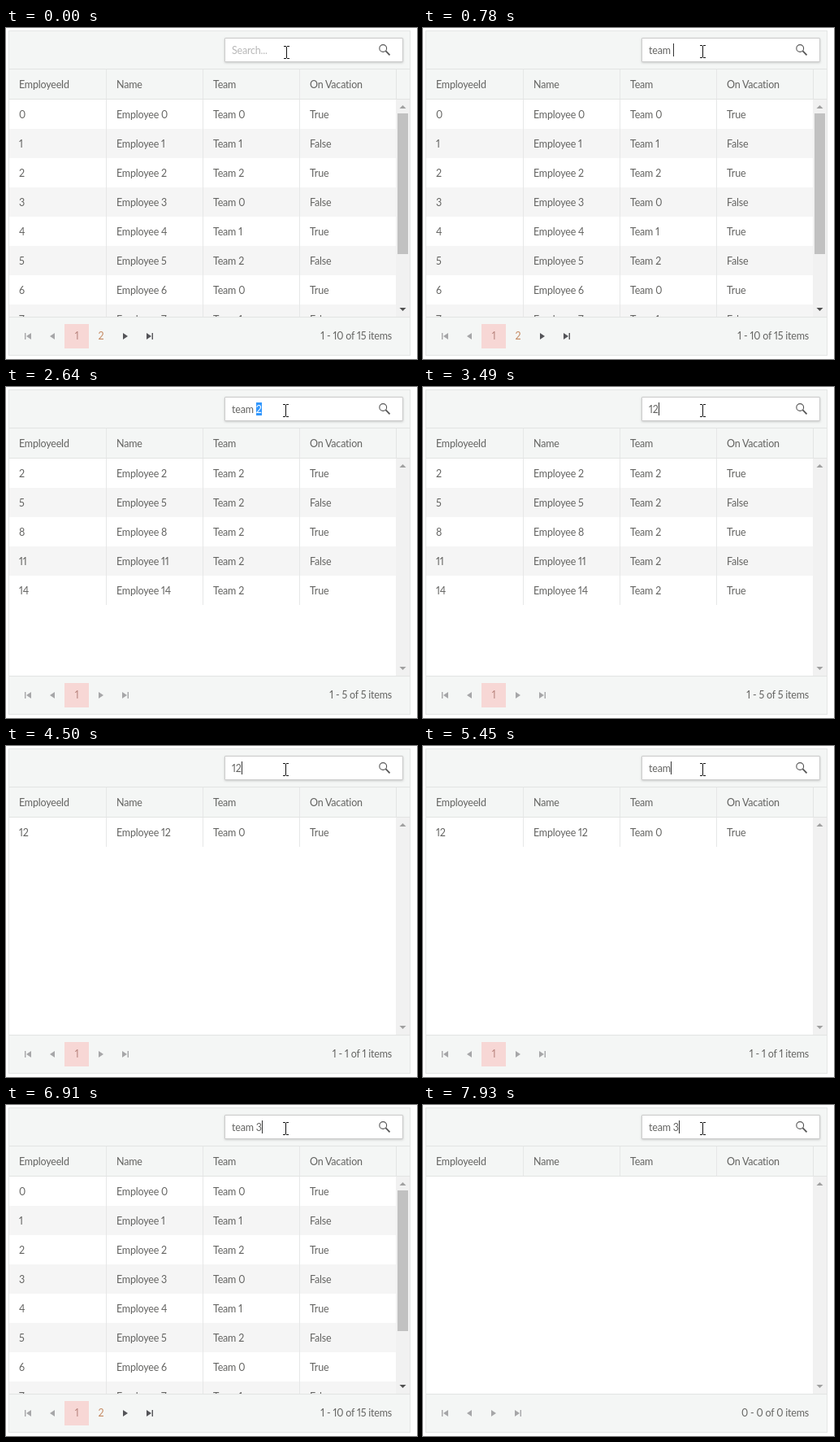
These frames come from a looping animation (506x407 px, 8000 ms). An HTML page:

```html
<!DOCTYPE html>
<html lang="en">
<head>
<meta charset="utf-8">
<title>Grid search</title>
<style>
  html, body { margin: 0; width: 100%; height: 100%; overflow: hidden; background: #fff; }
  body {
    position: relative;
    font: 12.5px/38px Lato, "Open Sans", sans-serif;
    font-variant-numeric: proportional-nums;
    letter-spacing: -.2px;
    color: #646462;
    white-space: pre;
  }
  .grid, .grid > *, .search, .thumb, .caret, svg { position: absolute; box-sizing: border-box; }
  svg { left: 0; top: 0; }
  .grid { left: 3px; top: 3px; width: 495px; height: 400px; border: 1px solid #e4e6e5; background: #f4f6f5; overflow: hidden; }
  .head { left: 0; top: 46px; width: 493px; height: 38px; border: solid #e2e4e3; border-width: 1px 0; }
  .row { display: flex; width: 477px; height: 36px; background: #fff; }
  .row:nth-child(even) { background: #f5f5f5; }
  .head .row { background: none; }
  .cell { box-sizing: border-box; width: 119px; padding-left: 12px; border-left: 1px solid #e6e7e7; }
  .cell:first-child { border-left-color: transparent; margin-left: -1px; width: 120px; }
  .cell:last-child { width: 120px; }
  .head .cell:last-child { border-right: 1px solid #e2e4e3; }
  .body { left: 0; top: 84px; width: 476px; height: 267px; background: #fff; overflow: hidden; }
  .track { left: 476px; top: 84px; width: 17px; height: 267px; background: #f1f1f1; }
  .thumb { left: 2px; top: 17px; width: 13px; height: 173px; background: #c1c1c1; }
  .pager { left: 0; top: 351px; width: 493px; height: 47px; border-top: 1px solid #e2e4e3; line-height: 30px; }
  .pages { position: absolute; left: 8px; top: 8px; display: flex; }
  .pages > * { position: static; width: 30px; height: 30px; text-align: center; }
  .num { color: #c58a62; }
  .num.on { color: #b9857f; background: #f7d7d5; }
  .info { position: absolute; right: 22px; top: 8px; }
  .search {
    left: 269px; top: 12px; width: 220px; height: 30px; padding-left: 8px;
    border: 1px solid #cbcbcb; border-radius: 1px; background: #fff;
    box-shadow: 0 1px 3px rgba(0, 0, 0, .18); line-height: 30px;
  }
  .hint { color: #b8b8b8; }
  .sel { display: inline-block; padding-top: 2px; line-height: 14px; background: #3297fd; color: #fff; }
  .caret { top: 6px; width: 1px; height: 16px; background: #333; }
</style>
</head>
<body>
<div class="grid">
  <div class="head" id="head"></div>
  <div class="body" id="body"></div>
  <div class="track">
    <div class="thumb" id="thumb"></div>
    <svg width="17" height="267">
      <path d="M4.5 11h8l-4-4z" fill="#a0a0a0"/>
      <path id="down" d="M4.5 256h8l-4 4z"/>
    </svg>
  </div>
  <div class="pager">
    <div class="pages" id="pages"></div>
    <div class="info" id="info"></div>
  </div>
</div>
<div class="search" id="search"></div>
<svg style="left:458px;top:19px" width="16" height="16" fill="none" stroke="#555">
  <circle cx="6.2" cy="6" r="4.4" stroke-width="1.1"/>
  <path d="M9.4 9.2L14.5 14.3" stroke-width="1.8"/>
</svg>
<svg id="beam" width="7" height="16" fill="none" stroke="#111">
  <path d="M0 .5h3M4 .5h3M3.5 1v14M0 15.5h3M4 15.5h3"/>
</svg>
<script>
const LOOP = 8000;
const $ = id => document.getElementById(id);

// time, typed text, caret shown, start of selection
const TYPING = [
  [0, "", 0],
  [230, "t", 1], [300, "te", 1], [380, "tea", 1], [530, "team", 1],
  [780, "team ", 1], [1080, "team 2", 1], [1630, "team 2", 0], [2180, "team 2", 1],
  [2640, "team 2", 0, 5], [2790, "team 2", 0, 0],
  [3420, "1", 1], [3490, "12", 1], [4040, "12", 0], [4500, "12", 1], [4670, "12", 0, 0],
  [5200, "te", 1], [5280, "tea", 1], [5450, "team", 1], [5980, "team", 0], [6440, "team", 1],
  [6610, "team ", 1], [6910, "team 3", 1], [7400, "team 3", 0], [7930, "team 3", 1]
];
const QUERIES = [[0, ""], [1480, "team 2"], [3810, "12"], [5750, "team"], [7230, "team 3"]];
const POINTER = [[0, 342, 22], [610, 341, 21]];

const PAGE_SIZE = 10;
const people = Array.from({ length: 15 }, (_, i) =>
  [String(i), "Employee " + i, "Team " + i % 3, i % 2 ? "False" : "True"]);

const ICONS = {
  first: "M11 11h1.4v8h-1.4zM19 11v8l-6-4z",
  prev: "M18 11v8l-6-4z",
  next: "M12 11v8l6-4z",
  last: "M11 11v8l6-4zM17.6 11h1.4v8h-1.4z"
};

const tag = (name, text) => `<span class="${name}">${text}</span>`;
const rowHtml = cells =>
  `<div class="row">${cells.map(c => `<div class="cell">${c}</div>`).join("")}</div>`;
const icon = (name, active) =>
  `<svg><path d="${ICONS[name]}" fill="${active ? "#545458" : "#a6a6a8"}"/></svg>`;

function stepAt(table, t) {
  let step = table[0];
  for (const s of table) if (s[0] <= t) step = s;
  return step;
}

function drawInput([, text, caret, from]) {
  let html = text || tag("hint", "Search...");
  if (from !== undefined) html = text.slice(0, from) + tag("sel", text.slice(from));
  $("search").innerHTML = html + (caret ? tag("caret", "") : "");
}

function drawTable([, query]) {
  const found = people.filter(p => p.some(c => c.toLowerCase().includes(query)));
  const total = found.length;
  const shown = found.slice(0, PAGE_SIZE);
  const count = Math.ceil(total / PAGE_SIZE);
  const more = count > 1;
  let numbers = "";
  for (let i = 1; i <= count; i++) numbers += tag(i === 1 ? "num on" : "num", i);

  $("body").innerHTML = shown.map(rowHtml).join("");
  $("pages").innerHTML = icon("first") + icon("prev") + numbers + icon("next", more) + icon("last", more);
  $("info").textContent = `${total ? 1 : 0} - ${shown.length} of ${total} items`;
  $("thumb").style.display = more ? "" : "none";
  $("down").setAttribute("fill", more ? "#505050" : "#a0a0a0");
}

function drawPointer([, x, y]) {
  $("beam").style.transform = `translate(${x}px, ${y}px)`;
}

const layers = [[TYPING, drawInput], [QUERIES, drawTable], [POINTER, drawPointer]]
  .map(([table, draw]) => ({ table, draw, last: null }));

function render(t) {
  for (const layer of layers) {
    const step = stepAt(layer.table, t);
    if (step !== layer.last) layer.draw(layer.last = step);
  }
}

$("head").innerHTML = rowHtml(["EmployeeId", "Name", "Team", "On Vacation"]);
const start = performance.now();
function tick() {
  render((performance.now() - start) % LOOP);
  requestAnimationFrame(tick);
}
tick();
</script>
</body>
</html>
```
